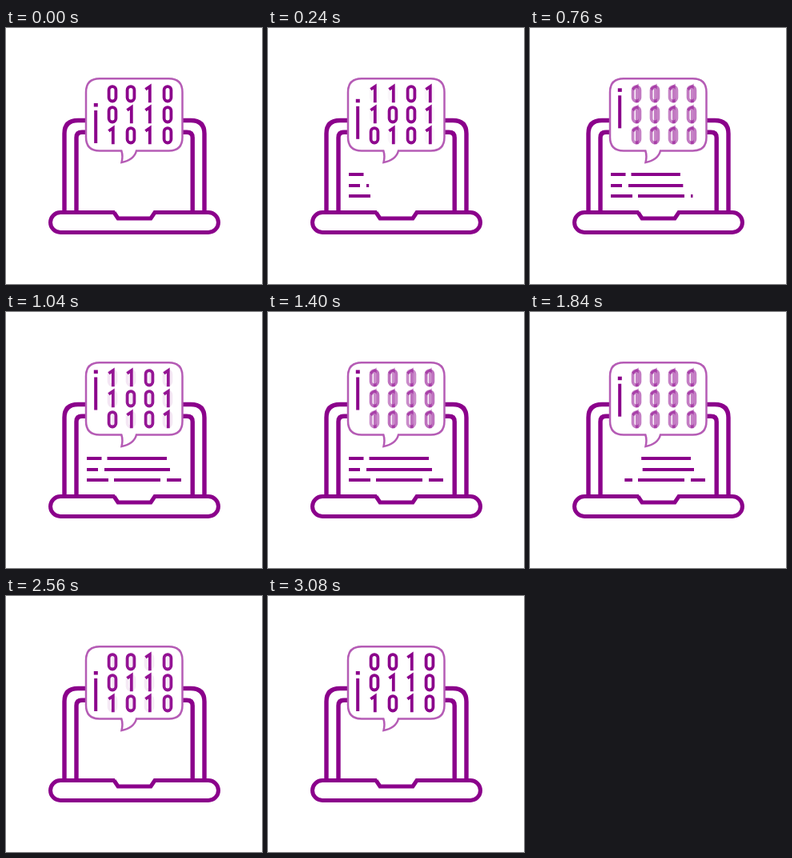
Animation of 320 by 320 pixels, one loop 3.12 s. Source, as an HTML page:

```html
<!DOCTYPE html>
<html lang="en">
<head>
<meta charset="utf-8">
<title>Laptop running code</title>
<style>
  html, body { margin: 0; width: 100%; height: 100%; overflow: hidden; background: #fff; }
  svg { display: block; width: 100vw; height: 100vh; }
</style>
</head>
<body>
<svg viewBox="0 0 320 320" fill="none" stroke="#8b008b">
  <defs>
    <rect id="zero" x="-4.4" y="-9.2" width="8.8" height="18.4" rx="4.4"/>
    <path id="one" d="M-4.6 -5.6 L.8 -9.3 V11"/>
  </defs>
  <g stroke-width="5.4">
    <path d="M73 230V132Q73 115.5 90 115.5H231Q248 115.5 248 132V230"/>
    <path d="M88 230V137Q88 130.3 95 130.3H226Q233.2 130.3 233.2 137V230"/>
    <path stroke-width="5" d="M136 230.5H68a12.5 12.5 0 0 0 0 25H253a12.5 12.5 0 0 0 0-25H186L181 238H140L135 230.5"/>
  </g>
  <path fill="#fff" stroke="#b55cb5" stroke-width="2.5" d="M117 63.2H203.5Q220.5 63.2 220.5 80.2V136.5Q220.5 153.5 203.5 153.5H163Q160 165 144.5 168Q146.500 160 144.300 153.500H117Q100 153.500 100 136.500V80.200Q100 63.200 117 63.200Z"/>
  <g id="cursor" fill="#8b008b" stroke="none">
    <rect x="109.8" y="94" width="5" height="4.500"/>
    <rect x="110.200" y="103" width="4" height="41"/>
  </g>
  <g id="bits" stroke-width="3.800"></g>
  <g id="bitsInverted" stroke-width="3.800"></g>
  <path id="code" stroke-width="4"/>
</svg>
<script>
const LOOP = 3120, ACTIVE = 2600, CYCLES = 6, CURSOR_RISE = 21.5;
const bits = ['0010', '0110', '1010'];
const reveal = [40, 870];
const codeRows = [
  { y: 183, erase: [1533, 2340], segments: [[101, 119.5], [126.5, 201]] },
  { y: 197, erase: [1533, 2340], segments: [[101, 115], [123, 205]] },
  { y: 210, erase: [1720, 2545], segments: [[101, 128], [135, 193], [201, 219]] }
];
const byId = id => document.getElementById(id);
const progress = (t, [start, end]) => Math.min(1, Math.max(0, (t - start) / (end - start)));

function drawBits(group, zeroBit) {
  group.innerHTML = bits.map((row, r) => [...row].map((bit, c) =>
    `<use href="#${bit === zeroBit ? 'zero' : 'one'}" x="${133 + c * 23}" y="${82.3 + r * 26}"/>`
  ).join('')).join('');
}

function rowPath({ y, erase, segments }, t) {
  const left = segments[0][0], width = segments.at(-1)[1] - left;
  const from = left + width * progress(t, erase);
  const to = left + width * progress(t, reveal);
  return segments.map(([a, b]) => [Math.max(a, from), Math.min(b, to)])
    .filter(([a, b]) => b > a)
    .map(([a, b]) => `M${a} ${y}H${b}`).join('');
}

function render(now) {
  const t = now % LOOP;
  const phase = Math.min(t, ACTIVE) / ACTIVE * CYCLES;
  const blend = (1 + Math.cos(phase * 2 * Math.PI)) / 2;
  byId('bits').setAttribute('opacity', blend);
  byId('bitsInverted').setAttribute('opacity', 1 - blend);
  const lift = progress(t, reveal) - progress(t, codeRows[0].erase);
  byId('cursor').setAttribute('transform', `translate(0 ${-CURSOR_RISE * lift})`);
  byId('code').setAttribute('d', codeRows.map(row => rowPath(row, t)).join(''));
}

drawBits(byId('bits'), '0');
drawBits(byId('bitsInverted'), '1');

const start = performance.now();
function tick() {
  render(performance.now() - start);
  requestAnimationFrame(tick);
}
tick();
</script>
</body>
</html>
```
